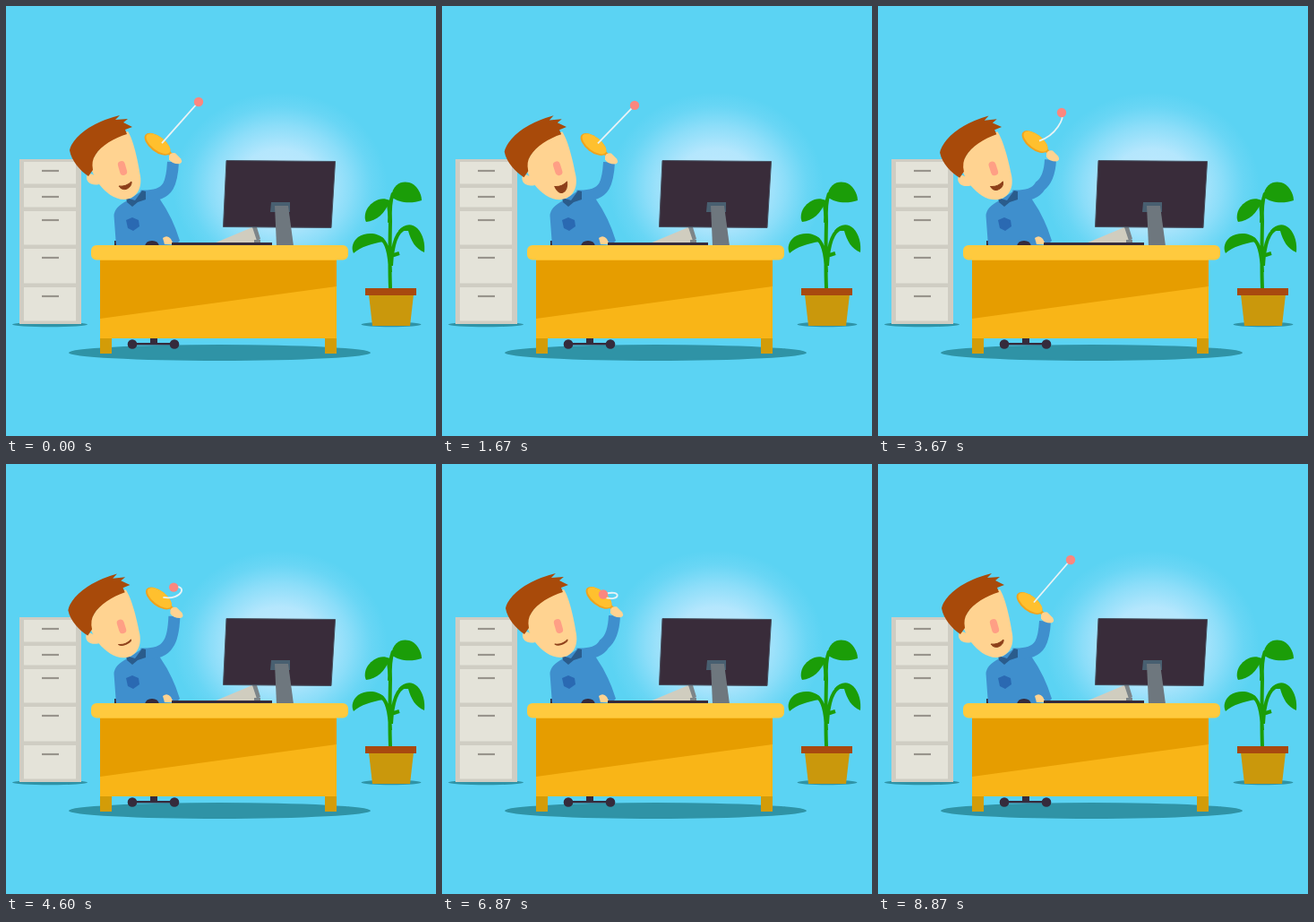
Animation, 480 px wide and 480 px high, one loop 8940 ms. Source, as an HTML page:

```html
<!DOCTYPE html>
<html lang="en">
<head>
<meta charset="utf-8">
<title>Paddle ball at the desk</title>
<style>
  html, body { margin: 0; width: 100%; height: 100%; overflow: hidden; background: #5bd3f3; }
  svg { display: block; width: 100vw; height: 100vh; }
  .shadow { fill: #2f93a6; }
  .skin { fill: #ffd391; }
  .dark { fill: #352b3c; }
</style>
</head>
<body>
<svg viewBox="0 0 480 480">
  <defs>
    <radialGradient id="glow">
      <stop offset="0" stop-color="#c4eaff"/>
      <stop offset=".4" stop-color="#c4eaff" stop-opacity=".85"/>
      <stop offset=".65" stop-color="#bce8ff" stop-opacity=".5"/>
      <stop offset=".85" stop-color="#b4e6ff" stop-opacity=".15"/>
      <stop offset="1" stop-color="#b0e5ff" stop-opacity="0"/>
    </radialGradient>
  </defs>
  <rect width="480" height="480" fill="#5bd3f3"/>
  <ellipse cx="306" cy="202" rx="120" ry="106" fill="url(#glow)"/>

  <g class="shadow">
    <ellipse cx="49" cy="355.5" rx="42" ry="2.8"/>
    <ellipse cx="430" cy="355.5" rx="33.5" ry="2.8"/>
    <ellipse cx="238.5" cy="387" rx="168.5" ry="9"/>
  </g>

  <g id="cabinet"><path d="M15 171H84V355H15Z" fill="#cfcdc3"/></g>

  <g fill="#1b9d08">
    <path d="M430 213C432 198 442 195 450 197C458 199 464 209 464 217C452 221 439 220 430 213Z"/>
    <path d="M428 217C419 212 409 218 404 225C400 231 400 238 402 241C414 240 423 231 428 219Z"/>
    <path d="M422 260C414 252 401 253 393 258C387 263 385 270 388 276C396 269 408 265 422 263Z"/>
    <path d="M438 251C444 243 453 242 459 248C466 255 468 266 467 275C457 271 452 262 449 251Z"/>
    <path d="M429 315Q428 290 429 240Q428 220 432 209M428 242Q429 230 426 217M429 297Q428 263 417 259M430 290Q432 252 446 248M430 279L439 276" fill="none" stroke="#1b9d08" stroke-width="4"/>
  </g>
  <path d="M405 322H455L451 357H409Z" fill="#ca980c"/>
  <path d="M401 315H458V323H401Z" fill="#a8490f"/>

  <g class="dark">
    <path d="M161 369H169V376H161ZM141 376H188V378.500H141Z"/>
    <circle cx="141" cy="377.5" r="5.3"/>
    <circle cx="188" cy="377.5" r="5.3"/>
    <path d="M121 262H126V268H121Z"/>
  </g>

  <path d="M123 268L120.500 234Q121 224 136 217L152 206Q165 210 172 216Q186 236 194 262L190 266L160 268Z" fill="#3f8fcd"/>
  <path id="arm" fill="none" stroke="#3f8fcd" stroke-width="13"/>
  <path d="M134 214L144 217L152 206L156 207V216L147 219L141 224L135 219Z" fill="#2a5c8c"/>
  <path d="M134 239L141 236L148 239L149 246L142 251L136 248Z" fill="#2a69b2"/>
  <path class="dark" d="M155 268Q156 262 163 262Q170 262 171 268Z"/>
  <path class="skin" d="M175 259Q180 255 184 260L187 266H177Z"/>

  <g id="head">
    <path class="skin" d="M136 140C142 149 147 171 150 190C152 205 145 215 132 216C121 216 111 208 104 199C96 201 89 197 90 190C92 186 96 187 98 189L94 179C99 160 116 147 136 140Z"/>
    <path d="M92 190C83 184 73 173 71 161Q72 155 79 147Q95 130 127 122L122 127L136 126L131 130L141 135L133 138L135 143C121 147 106 156 100 166Q95 173 97 183Z" fill="#a84a0a"/>
    <rect x="126" y="173" width="8" height="16" rx="4" fill="#ff9f85" transform="rotate(-16 130 181)"/>
    <path id="mouth" fill="#8d401a" stroke="#8d401a" stroke-linejoin="round"/>
  </g>

  <path d="M232 265L275 247L280 252V265Z" fill="#d0cdbf"/>
  <path d="M275 247H280L284 260L280 262ZM277 261H284V266H277Z" fill="#7d8589"/>
  <path class="dark" d="M185 264H297V268H185Z"/>
  <path d="M246 172.500L367.500 173.500L363 247.500L242.500 246.500Z" fill="#392c3a" stroke="#46505f"/>
  <path d="M296 219H317V230H295Z" fill="#485f70"/>
  <path d="M300 223H315L321 268H302Z" fill="#6e777e"/>

  <path d="M105 370H118V388H105ZM356 370H369V388H356Z" fill="#d39c08"/>
  <path d="M105 282H369V371H105Z" fill="#f9b517"/>
  <path d="M105 284H369V313L105 349Z" fill="#e69d00"/>
  <rect x="95" y="267" width="287" height="16.500" rx="6" fill="#ffca3e"/>

  <g id="paddle">
    <path d="M9 6L21 17" stroke="#f2a51d" stroke-width="4"/>
    <ellipse rx="17" ry="8.500" transform="rotate(38)" fill="#f0a31c"/>
    <ellipse cx=".5" cy="-1" rx="16" ry="7.500" transform="rotate(38)" fill="#ffc02e"/>
    <path class="skin" d="M13 13Q15 9 20 10L26 16Q29 21 24 22Q16 22 13 17Z"/>
  </g>
  <path id="string" fill="none" stroke="#e8f3f6" stroke-width="1.800"/>
  <circle id="ball" r="5.200" fill="#fb877f"/>
</svg>
<script>
const $ = id => document.getElementById(id);
const set = (id, name, value) => $(id).setAttribute(name, value);

const LOOP = 8940, STEP = 1000 / 15, BOUNCE = LOOP / 16;
const HIT = .255, RELEASE = .295, TAUT = .87;
const NEAR = { x: 180, y: 145.5 }, FAR = { x: 215, y: 107 };

const mix = (a, b, k) => a + (b - a) * k;
const wave = turns => Math.cos(2 * Math.PI * turns);
const hump = (t, length) => Math.max(0, Math.sin(Math.PI * t / length));
function smooth(from, to, x) {
  const k = Math.max(0, Math.min(1, (x - from) / (to - from)));
  return k * k * (3 - 2 * k);
}

// 0 on the paddle, 1 at the end of the string: falls in, then flies out
function reach(phase) {
  if (phase < HIT) return 1 - (phase / HIT) ** 2.5;
  if (phase < RELEASE) return 0;
  const left = Math.max(0, (TAUT - phase) / (TAUT - RELEASE));
  return 1 - left * left;
}

// Pictures follow each other at 15 per second, on whole hundredths
function stepTime(ms) {
  let n = Math.round(ms / STEP);
  if (Math.round(n * STEP / 10) * 10 > ms) n--;
  return n * STEP;
}

function draw(t) {
  const phase = t / BOUNCE % 1;
  const far = reach(phase), slack = Math.sqrt(1 - far);

  const px = 169 + 6 * (smooth(.22, .26, phase) - smooth(.78, TAUT, phase));
  const py = 152.3 + 3.2 * wave(phase - .85);
  const wristX = px + 17.5, wristY = py + 20;
  set('paddle', 'transform', `translate(${px} ${py})`);
  set('arm', 'd', `M150 212Q174 213 181 201Q${wristX - 1} 193 ${wristX} ${wristY}`);

  const droop = 2.3 * (1 - wave(2 * t / LOOP));
  const bx = mix(NEAR.x, FAR.x, far), by = mix(NEAR.y, FAR.y, far) + droop * far;
  set('ball', 'cx', bx);
  set('ball', 'cy', by);

  const sx = px + 5, sy = py - 1;
  const bend = (k, dx, dy) => `${mix(sx, bx, k) + slack * dx} ${mix(sy, by, k) + slack * dy}`;
  set('string', 'd', `M${sx} ${sy}C${bend(1 / 3, 20, 8)} ${bend(2 / 3, 22, -8)} ${bx} ${by}`);

  const open = .5 + 9.5 * hump((t + 800) % LOOP, 5400);
  set('head', 'transform', `rotate(${-2.2 * hump(t, 6900)} 140 212)`);
  set('mouth', 'd', `M126 201Q134 202 140 196C141 ${198 + open} 131 ${204 + open} 126 201Z`);
}

const edges = [174, 203, 229, 271, 314, 356];
$('cabinet').innerHTML += edges.slice(0, -1).map((y, i) =>
  `<path d="M20 ${y}H78V${edges[i + 1] - 4.5}H20Z" fill="#e4e3d9"/>
   <path d="M40 ${y + 10}h19" stroke="#98948c" stroke-width="2.200"/>`).join('');

const start = performance.now();
function tick() {
  draw(stepTime((performance.now() - start) % LOOP));
  requestAnimationFrame(tick);
}
draw(0);
tick();
</script>
</body>
</html>
```
